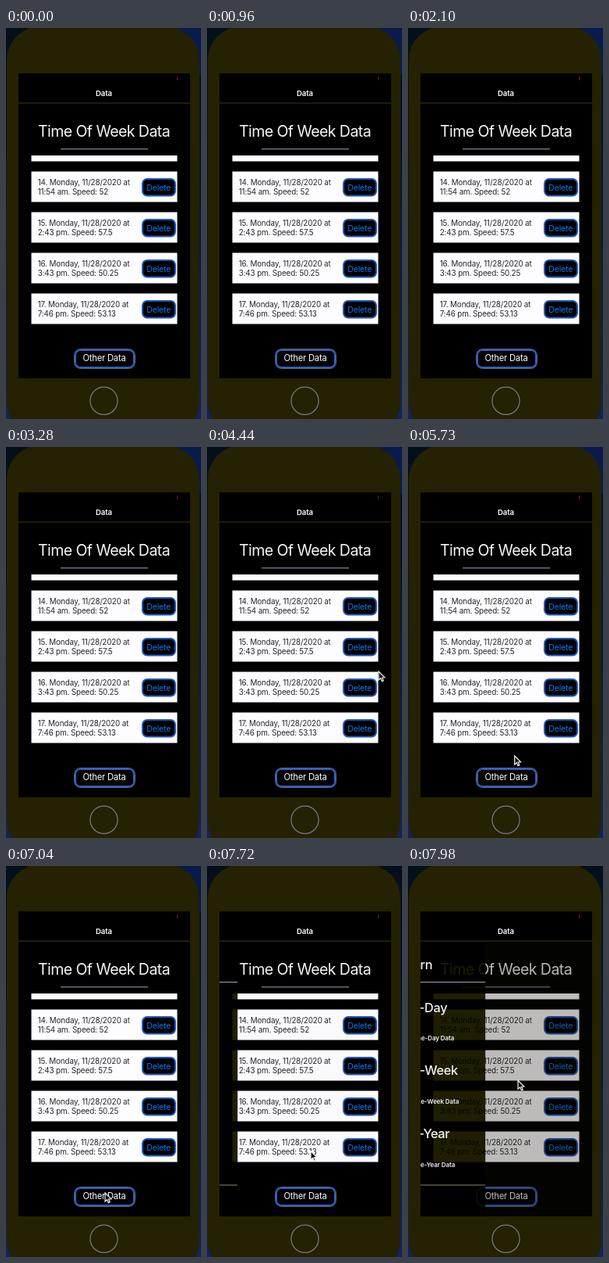
An HTML page with a canvas that plays this animation: 250x500 px, repeating every 8 s.

```html
<!DOCTYPE html>
<html lang="en">
<head>
<meta charset="utf-8">
<title>Time Of Week Data</title>
<style>
html, body { margin: 0; width: 100%; height: 100%; overflow: hidden; background: #050914; }
canvas { display: block; width: 250px; height: 500px; }
</style>
</head>
<body>
<canvas id="stage" width="250" height="500"></canvas>
<script>
const ctx = document.getElementById('stage').getContext('2d');
const LOOP = 8000;
const SCREEN = { x: 16, y: 58, w: 220, h: 390 };
const BODY = '#242202';

const entries = [
  ['14. Monday, 11/28/2020 at', '11:54 am. Speed: 52'],
  ['15. Monday, 11/28/2020 at', '2:43 pm. Speed: 57.5'],
  ['16. Monday, 11/28/2020 at', '3:43 pm. Speed: 50.25'],
  ['17. Monday, 11/28/2020 at', '7:46 pm. Speed: 53.13']
];

// text, gap to the drawer's right edge, baseline, size
const menu = [
  ['Return', 68, 132, 16.4],
  ['Time-Day', 49, 187, 16.4],
  ['Time-Day Data', 40, 223, 8],
  ['Time-Week', 35.5, 267, 16.4],
  ['Time-Week Data', 34, 304, 8],
  ['Time-Year', 46, 348, 16.4],
  ['Time-Year Data', 39, 385, 8]
];

// time, x, y of the pointer's tip
const pointerPath = [
  [4280, 238, 278], [4440, 220, 287], [4700, 220, 287],
  [5490, 140, 392], [5590, 140, 392], [5730, 136.7, 395],
  [6330, 128, 416], [7040, 127, 418], [7460, 127, 418],
  [7720, 133, 365], [7980, 141, 274.5], [8000, 141.5, 269]
];

// time, right edge of the drawer
const drawerPath = [[7620, 16], [7720, 39], [7980, 99], [8000, 103]];

function track(keys, t) {
  if (t < keys[0][0]) return null;
  const i = keys.findIndex(k => k[0] > t);
  if (i < 0) return keys[keys.length - 1].slice(1);
  const a = keys[i - 1], b = keys[i];
  const p = (t - a[0]) / (b[0] - a[0]);
  return a.slice(1).map((v, n) => v + (b[n + 1] - v) * p);
}

function rect(x, y, w, h, color) {
  ctx.fillStyle = color;
  ctx.fillRect(x, y, w, h);
}

function text(str, x, y, size, color, { weight = 400, align = 'left', spacing = 0 } = {}) {
  ctx.font = `${weight} ${size}px Inter, "Open Sans", sans-serif`;
  ctx.letterSpacing = spacing + 'px';
  ctx.textAlign = align;
  ctx.fillStyle = color;
  ctx.fillText(str, x, y);
}

function box(x, y, w, h, r, fill, stroke, width) {
  ctx.beginPath();
  ctx.roundRect(x, y, w, h, r);
  ctx.fillStyle = fill;
  ctx.fill();
  if (!stroke) return;
  ctx.strokeStyle = stroke;
  ctx.lineWidth = width;
  ctx.stroke();
}

function drawPhone(t) {
  const glow = ctx.createLinearGradient(0, 0, 0, 500);
  glow.addColorStop(0, '#03101a');
  glow.addColorStop(0.3, '#06122e');
  glow.addColorStop(1, '#14235f');
  rect(0, 0, 250, 500, glow);
  // the blue in the upper right corner dies away late in the loop
  const blue = 1 - Math.min(1, Math.max(0, (t - 7000) / 700));
  rect(200, 0, 50, 60, `rgba(10,30,90,${0.8 * blue})`);
  box(1, -2, 247, 524, 43, BODY);
  ctx.beginPath();
  ctx.arc(125.5, 476.8, 17.6, 0, Math.PI * 2);
  ctx.strokeStyle = '#7a7a80';
  ctx.lineWidth = 1.2;
  ctx.stroke();
  rect(SCREEN.x, SCREEN.y, SCREEN.w, SCREEN.h, '#000');
}

function drawCard(lines, y) {
  rect(32.5, y + 0.5, 187, 39, '#fdfcff');
  lines.forEach((line, i) =>
    text(line, 40.7, y + 18 + i * 11.5, 9.9, '#26262a', { spacing: -0.15 }));
  box(175, y + 10, 42, 21.5, 6, '#000', '#1f58bd', 2);
  text('Delete', 195.7, y + 24.5, 10.6, '#0a78ee', { align: 'center', spacing: -0.2 });
}

function drawPage() {
  text('Time Of Week Data', 41, 139, 19.6, '#f6f6f4', { spacing: -0.6 });
  rect(70, 154.3, 112, 1, '#a4a6bc');
  rect(32.5, 163, 187, 7.5, '#fdfcff');
  entries.forEach((lines, i) => drawCard(lines, 183 + i * 52));
  box(87.5, 410.5, 78, 25, 8, '#000', '#5c6478', 1);
  box(89, 412, 75, 22, 6, '#000', '#2d60c8', 2);
  text('Other Data', 126, 426.3, 11.2, '#fff', { align: 'center', spacing: -0.2 });
}

function drawDrawer(edge) {
  const { x, w } = SCREEN;
  const dim = 0.27 * Math.pow((edge - x) / 83, 2.5);
  rect(edge, 97, x + w - edge, 351, `rgba(14,14,0,${dim})`);
  ctx.save();
  ctx.beginPath();
  ctx.rect(x, 97, edge - x, 351);
  ctx.clip();
  ctx.globalCompositeOperation = 'multiply';
  rect(x, 97, w, 351, '#201e00');
  ctx.globalCompositeOperation = 'source-over';
  rect(x, 148, edge - x, 1, '#a4a6bc');
  rect(x, 407.5, edge - x, 1, '#85846f');
  for (const [str, gap, y, size] of menu)
    text(str, edge - gap, y, size, '#f2f2f2',
      { weight: size > 10 ? 500 : 600, align: 'right', spacing: size > 10 ? -0.4 : -0.1 });
  ctx.restore();
}

function drawHeader() {
  text('Data', 125.5, 87, 9.6, '#fff', { weight: 600, align: 'center', spacing: -0.1 });
  rect(SCREEN.x, 95.5, SCREEN.w, 1, '#3e3b08');
  rect(219, 62, 1, 5, '#7a1c18');
}

function drawPointer(x, y) {
  const shape = [[0, 0], [0, 11], [2.6, 8.7], [4.4, 12.6], [6.2, 11.8], [4.5, 8], [7.8, 7.8]];
  ctx.beginPath();
  shape.forEach(([dx, dy]) => ctx.lineTo(x + dx, y + dy));
  ctx.closePath();
  ctx.fillStyle = '#0a0a0a';
  ctx.fill();
  ctx.strokeStyle = '#f4f4f0';
  ctx.lineWidth = 1.2;
  ctx.stroke();
}

function draw(t) {
  drawPhone(t);
  drawPage();
  const drawer = track(drawerPath, t);
  if (drawer) drawDrawer(drawer[0]);
  drawHeader();
  const tip = track(pointerPath, t);
  if (tip) drawPointer(...tip);
}

const start = performance.now();
function tick() {
  draw((performance.now() - start) % LOOP);
  requestAnimationFrame(tick);
}
tick();
</script>
</body>
</html>
```
